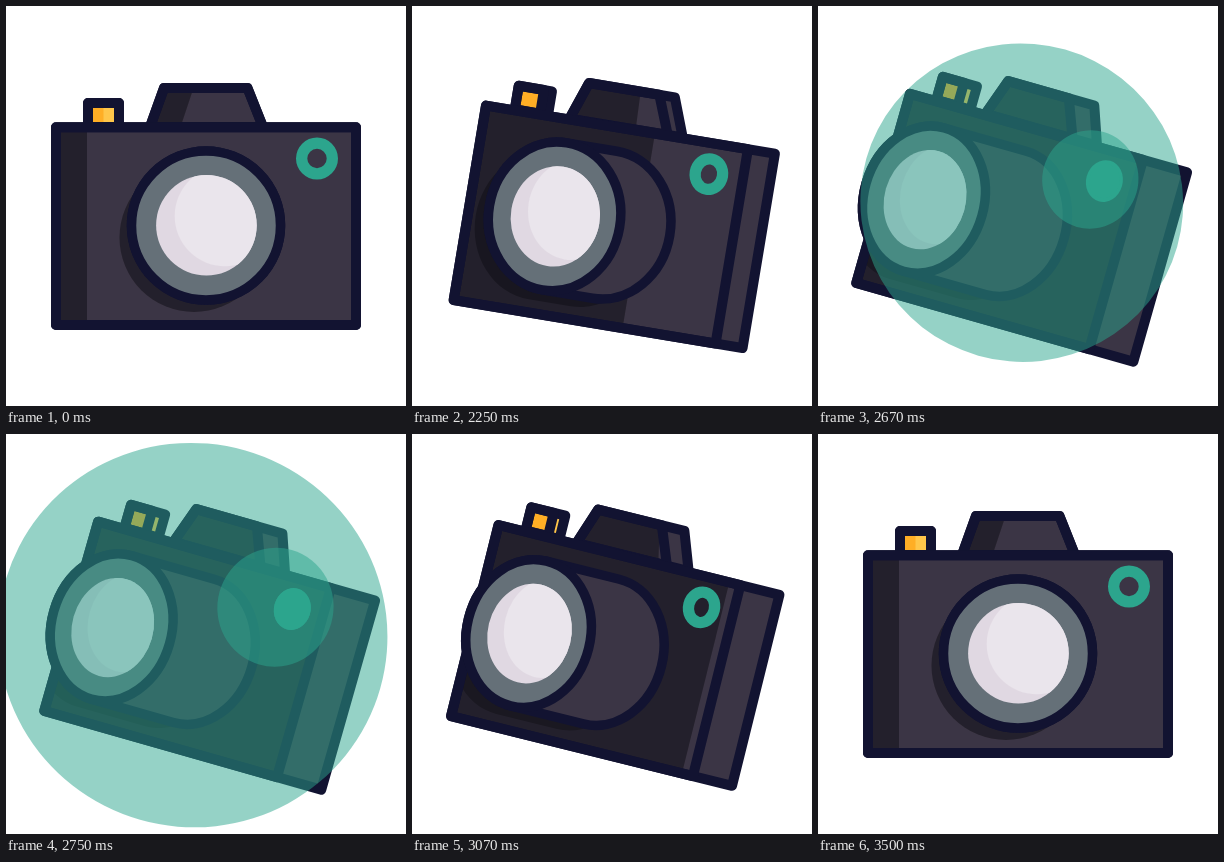
An HTML page with a canvas that plays this animation: 400x400 px, repeating every 3.52 s.

```html
<!DOCTYPE html>
<html>
<head>
<meta charset="utf-8">
<style>
  html, body { margin: 0; height: 100%; overflow: hidden; background: #fff; }
  canvas { display: block; width: 100vmin; height: 100vmin; }
</style>
</head>
<body>
<canvas></canvas>
<script>
const LOOP = 3520, LINE = '#121331', BODY = '#3b3545', GREEN = '#2ca58d';
const shade = alpha => `rgba(1,0,7,${alpha})`;
const canvas = document.querySelector('canvas');
const ctx = canvas.getContext('2d');
const scale = devicePixelRatio || 1;
canvas.width = canvas.height = 400 * scale;

const mix = (a, b, k) => a + (b - a) * k;
const clamp = x => Math.max(0, Math.min(1, x));
const smooth = x => x * x * (3 - 2 * x);

// cubic-bezier(.25, .1, .25, 1)
function ease(x) {
  const curve = (a, b, u) => 3 * a * u * (1 - u) ** 2 + 3 * b * u * u * (1 - u) + u ** 3;
  let lo = 0, hi = 1;
  for (let i = 0; i < 24; i++) {
    const mid = (lo + hi) / 2;
    if (curve(.25, .25, mid) < x) lo = mid; else hi = mid;
  }
  return curve(.1, 1, lo);
}

function poly(...points) {
  const path = new Path2D();
  points.forEach(([x, y]) => path.lineTo(x, y));
  path.closePath();
  return path;
}
const box = (x1, y1, x2, y2) => poly([x1, y1], [x2, y1], [x2, y2], [x1, y2]);

function oval(x, y, rx, ry) {
  const path = new Path2D();
  path.ellipse(x, y, rx, ry, 0, 0, 7);
  return path;
}

// Oval swept sideways from x1 to x2
function tube(x1, x2, y, rx, ry) {
  const path = new Path2D();
  path.ellipse(x2, y, rx, ry, 0, -Math.PI / 2, Math.PI / 2);
  path.ellipse(x1, y, rx, ry, 0, Math.PI / 2, Math.PI * 1.5);
  path.closePath();
  return path;
}

function fill(path, color) {
  ctx.fillStyle = color;
  ctx.fill(path);
}
function stroke(path, width = 10) {
  ctx.lineWidth = width;
  ctx.stroke(path);
}
function clipped(mask, draw) {
  ctx.save();
  ctx.clip(mask);
  draw();
  ctx.restore();
}

function drawTrigger(m) {
  const left = m(82, 87), split = m(113, 109), right = m(113, 122.5);
  const front = box(left, 97, split, 121), whole = box(left, 97, right, 121);
  fill(whole, '#ffc64a');
  clipped(front, () => fill(box(left, 97, m(97.5, 120), 121), '#ffae25'));
  stroke(whole);
  stroke(front);
}

function drawHump(m) {
  const top = m(82, 83.3);
  const topLeft = [m(158, 151), top], lowLeft = [m(144, 138), 121];
  const topSplit = [m(241.5, 214), top], lowSplit = [m(257, 228.5), 121];
  const front = poly(topLeft, topSplit, lowSplit, lowLeft);
  const whole = poly(topLeft, [m(241.5, 240.5), top], [m(257, 254), 121], lowLeft);
  fill(whole, BODY);
  clipped(front, () => fill(poly(topLeft, [m(187.5, 219), top], [m(174.5, 230), 121], lowLeft), shade(.4)));
  stroke(whole);
  stroke(front);
}

function drawBody(m, k) {
  const left = m(50, 60), split = m(350, 302), right = m(350, 348), top = m(121.3, 122.3);
  const lens = m(200, 102), base = m(200, 187.5), lensY = m(219.5, 220.3);
  const front = box(left, top, split, 319), whole = box(left, top, right, 319);
  fill(whole, BODY);
  clipped(front, () => {
    fill(box(left, top, m(81, 327), 319), shade(.4));
    fill(tube(lens - 12, base - m(12, 26), 231.5, 74.5 * k, 74.5), shade(m(.4, .25)));
  });
  stroke(whole);
  stroke(front);

  const ring = oval(m(311, 270.7), m(152.5, 153.2), m(21, 18.3), 21);
  ring.addPath(oval(m(311, 270.7), m(152.5, 153.2), m(9.7, 7), 9.7));
  ctx.fillStyle = GREEN;
  ctx.fill(ring, 'evenodd');

  const barrel = tube(lens, base, lensY, 74.5 * k, 74.5);
  fill(barrel, BODY);
  stroke(barrel, 9.5);
  const rim = oval(lens, lensY, 74.5 * k, 74.5);
  fill(rim, '#657078');
  stroke(rim, 9.5);
  const glass = oval(lens + m(.4, 1), lensY - .2, 50.3 * k, 50.3);
  fill(glass, '#e0d8e2');
  clipped(glass, () => fill(oval(lens + 19 * k, lensY - 9.5, 50.3 * k, 50.3), '#eae5ec'));
}

function drawFlash(m, q) {
  if (!q) return;
  const x = m(311, 270.7), y = 153;
  ctx.globalAlpha = .5;
  fill(oval(mix(x, 182, q), mix(y, 205.5, q), 195 * q, 192 * q), GREEN);
  fill(oval(mix(x, 254, q), mix(y, 156, q), 58 * q, 59.5 * q), GREEN);
  ctx.globalAlpha = 1;
  fill(oval(x, y, m(21, 18.3) * q, 21 * q), GREEN);
}

function frame(now) {
  const t = now % LOOP;
  const s = Math.max(0, Math.min(t - 2000, 3500 - t)); // out and back
  const turn = ease(clamp(s / 730));
  const k = 1 - .193 * turn;
  const m = (a, b) => mix(a, b, turn);

  ctx.setTransform(scale, 0, 0, scale, 0, 0);
  ctx.fillStyle = '#fff';
  ctx.fillRect(0, 0, 400, 400);
  ctx.translate(200, 220);
  ctx.rotate(turn * 15.9 * Math.PI / 180);
  ctx.translate(-200, -220);
  ctx.strokeStyle = LINE;
  ctx.lineJoin = 'round';

  drawTrigger(m);
  drawHump(m);
  drawBody(m, k);
  drawFlash(m, smooth(clamp((s - 450) / 300)));
}

const start = performance.now();
function tick() {
  frame(performance.now() - start);
  requestAnimationFrame(tick);
}
tick();
</script>
</body>
</html>
```
